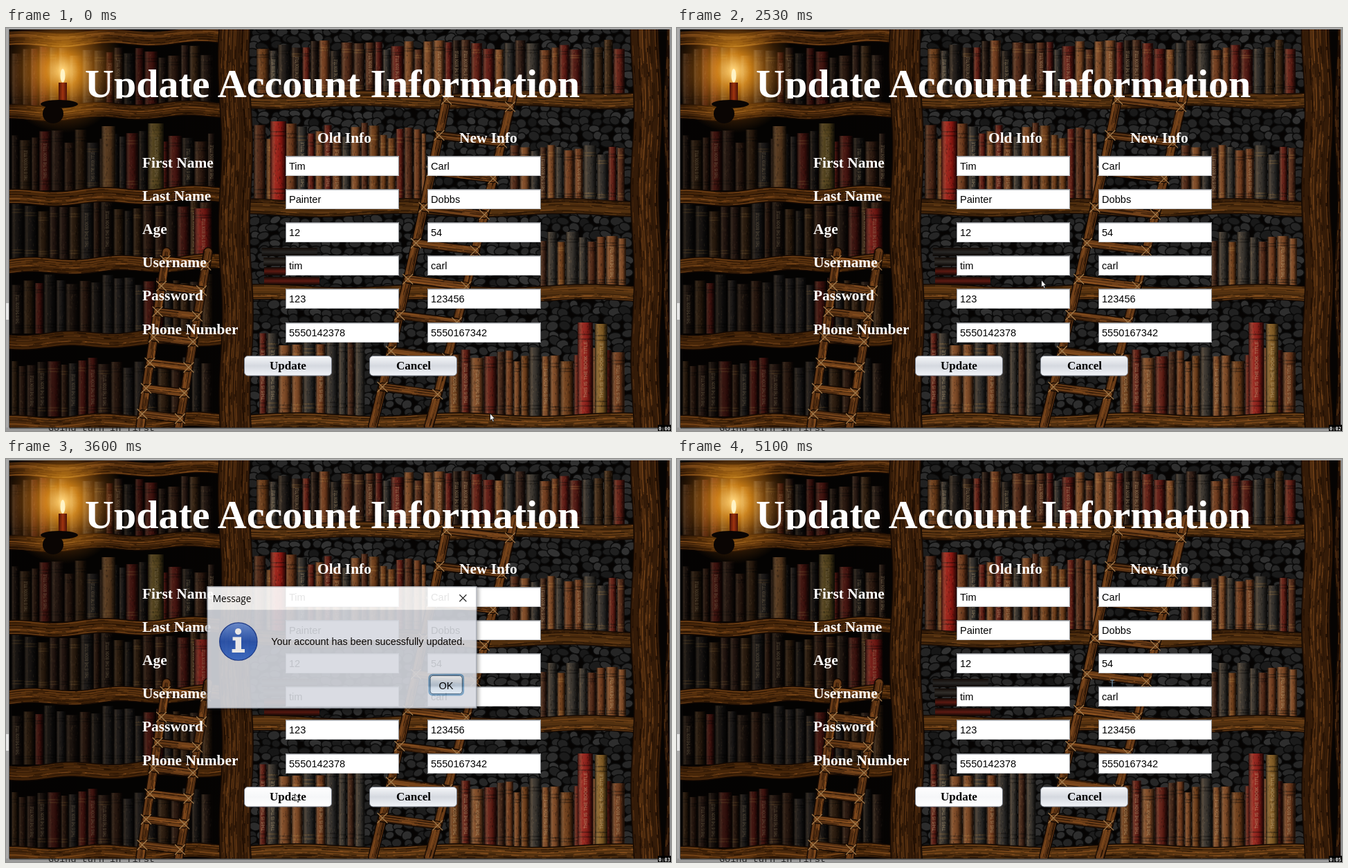
These frames come from a looping animation (961 px wide and 583 px high, 5200 ms). An HTML page with a canvas:

```html
<!DOCTYPE html>
<html lang="en">
<head>
<meta charset="utf-8">
<title>Update Account Information</title>
<style>
html, body { margin: 0; width: 100%; height: 100%; overflow: hidden; background: #000; }
canvas, #ui { position: absolute; left: 0; top: 0; width: 961px; height: 583px; }
.serif { font: bold 21.4px "Liberation Serif", "Times New Roman", serif; fill: #fff; }
.sans { font: 14.6px "Liberation Sans", Arial, sans-serif; fill: #000; }
</style>
</head>
<body>
<canvas id="room" width="961" height="583"></canvas>
<svg id="ui" viewBox="0 0 961 583">
  <defs>
    <linearGradient id="btn" x2="0" y2="1">
      <stop stop-color="#f7f8fa"/><stop offset=".5" stop-color="#d5d9e0"/><stop offset="1" stop-color="#f2f4f8"/>
    </linearGradient>
    <linearGradient id="hot" x2="0" y2="1">
      <stop stop-color="#fff"/><stop offset=".5" stop-color="#f6f7f9"/><stop offset="1" stop-color="#fff"/>
    </linearGradient>
    <linearGradient id="ok" x2="0" y2="1">
      <stop stop-color="#f2f6fa"/><stop offset=".5" stop-color="#c3d0de"/><stop offset="1" stop-color="#dfe9f3"/>
    </linearGradient>
    <linearGradient id="okHot" x2="0" y2="1">
      <stop stop-color="#fff"/><stop offset=".5" stop-color="#d6e0ea"/><stop offset="1" stop-color="#f0f6fc"/>
    </linearGradient>
    <linearGradient id="blue" x2="0" y2="1">
      <stop stop-color="#6f95dd"/><stop offset=".5" stop-color="#2a57b5"/><stop offset="1" stop-color="#3f72d2"/>
    </linearGradient>
    <filter id="soft" x="-10%" y="-10%" width="120%" height="120%"><feGaussianBlur stdDeviation="3"/></filter>
  </defs>
  <svg width="961" height="102"><text class="serif" x="114" y="100" style="font-size:58px">Update Account Information</text></svg>
  <g id="form"></g>
  <g id="dialog">
    <rect x="288" y="184" width="395" height="180" opacity=".45" filter="url(#soft)"/>
    <rect x="290" y="184" width="391" height="177" fill="#d6d9e0"/>
    <rect x="290" y="184" width="391" height="34" fill="#fff"/>
    <rect x="290.5" y="184.5" width="390" height="176" fill="none" stroke="#6d7480" stroke-opacity=".7"/>
    <text x="298" y="207" style="font:13.7px 'Open Sans','Noto Sans',sans-serif">Message</text>
    <path d="M656 196l10 10m0-10l-10 10" stroke="#111" stroke-width="1.2"/>
    <circle cx="335.3" cy="264" r="27.3" fill="url(#blue)" stroke="#1d3f94" stroke-width="1.2"/>
    <circle cx="335" cy="249.5" r="4.6" fill="#fff"/>
    <path d="M327 257.5h12.5v17.5h5v5h-18.5v-5h5v-12.500h-4z" fill="#fff"/>
    <text class="sans" x="383" y="269" style="font-size:14.4px">Your account has been sucessfully updated.</text>
    <rect x="612" y="312" width="49.5" height="29.5" rx="5" fill="none" stroke="#6e9bc0" stroke-width="2.4"/>
    <rect id="okBtn" x="613.5" y="313.5" width="46.5" height="26.5" rx="4" stroke="#35536e"/>
    <text class="sans" x="626" y="333">OK</text>
  </g>
  <path d="M0 0H961V2H5V583H0Z" fill="#a9a9a9"/>
  <path d="M4.5 2V579" stroke="#555"/>
  <path d="M959 2h2v577h-2z" fill="#8c8c8c"/>
  <rect y="398" width="4" height="24" fill="#e4e4e4"/>
  <svg y="578" width="961" height="5">
    <rect width="961" height="5" fill="#9b9b9b"/>
    <rect x="5" width="938" height="1.5" fill="#444"/>
    <text x="61" y="5" style="font:13.5px 'Liberation Mono',monospace" fill="#222">Going turn in first</text>
  </svg>
  <rect x="942" y="574" width="19" height="9"/>
  <text id="clock" x="943" y="581.5" fill="#fff" style="font:bold 7px 'DejaVu Sans Mono',monospace"></text>
  <path id="arrow" d="M.5 .5V11L2.8 8.8 4.5 12.5 6.2 11.8 4.6 8.2H7.5Z" fill="#fff" stroke="#111" stroke-width=".9"/>
  <path id="caret" d="M626 320h6M629 320v10" fill="none" stroke="#7fa6c4"/>
</svg>
<script>
const $ = id => document.getElementById(id);
const g = $('room').getContext('2d');
let seed = 41;
const rnd = (a = 0, b = 1) => {
  seed = (seed * 1664525 + 1013904223) % 4294967296;
  return a + (b - a) * seed / 4294967296;
};
const pick = list => list[Math.floor(rnd(0, list.length))];

// ---- library background ----
const dark = ['#1c110d', '#2b1812', '#171413', '#30190f', '#4a120e', '#232020', '#35200f', '#5c1611'];
const warm = ['#4c2414', '#6c371a', '#5e1a12', '#33302c', '#7a4522', '#3c2014', '#6b3a17', '#292827'];

function fade(x0, y0, x1, y1, ...colors) {
  const f = g.createLinearGradient(x0, y0, x1, y1);
  colors.forEach((c, i) => f.addColorStop(i / (colors.length - 1), c));
  return f;
}

function book(x, w, top, base, color) {
  const h = base - top;
  g.fillStyle = color;
  g.fillRect(x, top, w, h);
  g.fillStyle = rnd() < .3 ? 'rgba(190,140,70,.25)' : 'rgba(0,0,0,.35)';
  for (const k of [.12, .17, .83, .88]) g.fillRect(x, top + h * k, w, 2);
  for (let i = 0; i < h * w / 22; i++) {
    g.fillStyle = rnd() < .6 ? 'rgba(0,0,0,.3)' : 'rgba(255,200,140,.12)';
    g.fillRect(x + rnd(0, w - 1), top + rnd(0, h - 2), 1, rnd(1, 4));
  }
  if (rnd() < .25) {
    g.save();
    g.translate(x + w / 2 + 3, base - h * .2);
    g.rotate(-Math.PI / 2);
    g.font = 'bold 7px "Liberation Sans", sans-serif';
    g.fillStyle = 'rgba(215,190,145,.45)';
    g.fillText('THIS IS THE BOOK TITLE', 0, 0, h * .6);
    g.restore();
  }
  g.fillStyle = fade(x, 0, x + w, 0, 'rgba(0,0,0,.7)', 'rgba(255,210,160,.08)', 'rgba(0,0,0,.15)', 'rgba(0,0,0,.85)');
  g.fillRect(x, top, w, h);
}
function row(x0, x1, floor, height, colors) {
  for (let x = x0, w; x < x1 - 6; x += w) {
    w = Math.min(rnd(10, 20), x1 - x);
    book(x, w - 1, floor - height * rnd(.78, 1), floor, pick(colors));
  }
}

// Strokes a path of points as grained wood.
function beam(pts, w, color) {
  const [x, y] = pts[0], [u, v] = pts[pts.length - 1], len = Math.hypot(u - x, v - y);
  const line = (off, lw, c) => {
    g.lineWidth = lw;
    g.strokeStyle = c;
    g.beginPath();
    for (const p of pts) g.lineTo(p[0] + off * (y - v) / len, p[1] + off * (u - x) / len);
    g.stroke();
  };
  g.lineJoin = 'round';
  line(0, w, '#140903');
  line(0, w - 3, color);
  for (let i = 0; i < w * .8; i++) {
    g.setLineDash([rnd(10, 60), rnd(3, 30)]);
    line(rnd(-.42, .42) * w, rnd(.6, 1.6), rnd() < .6 ? 'rgba(20,8,0,.5)' : 'rgba(175,105,42,.35)');
  }
  g.setLineDash([]);
}
function wavy(x, y, u, v, w, color) {
  const pts = [], phase = rnd(0, 6), across = u - x > v - y;
  for (let k = 0; k <= 1; k += 1 / 32) {
    const s = 2.5 * Math.sin(k * 15 + phase);
    pts.push([x + (u - x) * k + (across ? 0 : s), y + (v - y) * k + (across ? s : 0)]);
  }
  beam(pts, w, color);
}

function ladder(x, top, gap, lean, bend, step) {
  const rail = (side, y) => {
    const d = y - top;
    return [x - lean * d - bend * d * d + side * gap * (1 - d * .0003), y];
  };
  const ys = Array.from({ length: 12 }, (_, i) => top + (576 - top) * i / 11);
  g.lineCap = 'round';
  for (const side of [0, 1]) beam(ys.map(y => rail(side, y)), 14, '#673a17');
  for (let y = top + step / 3; y < 570; y += step) {
    const ends = [rail(0, y), rail(1, y + gap / 9)];
    beam(ends, 13, '#704019');
    g.strokeStyle = '#a07a4c';
    g.lineWidth = 1.3;
    for (const [a, b] of ends) for (const k of [-1, 1]) {
      g.beginPath();
      g.moveTo(a - 7, b - 7 * k);
      g.lineTo(a + 7, b + 7 * k);
      g.stroke();
    }
  }
  g.lineCap = 'butt';
}

function paintRoom() {
  g.fillStyle = '#060403';
  g.fillRect(0, 0, 961, 583);
  g.strokeStyle = '#0b0b0b';
  g.lineWidth = 1.5;
  for (let y = 4; y < 575; y += 11) for (let x = 358; x < 905; x += 15) {
    g.fillStyle = `hsl(0 0% ${rnd(9, 20)}%)`;
    g.beginPath();
    g.ellipse(x + rnd(-4, 4), y + rnd(-3, 3), rnd(6, 10), rnd(5, 7), rnd(-.5, .5), 0, 7);
    g.fill();
    g.stroke();
  }

  const left = [14, 120, 243, 342, 450, 570], right = [104, 260, 384, 570];
  for (const y of left.slice(1)) row(8, 303, y - 8, 88, dark);
  row(362, 900, 95, 78, dark.concat(warm));
  row(358, 608, 252, 115, warm);
  row(728, 895, 252, 85, warm);
  row(772, 897, 376, 85, warm);
  row(366, 525, 562, 130, warm);
  row(640, 898, 562, 100, warm);
  // a few large spines
  book(138, 20, 142, 235, '#80522a');
  book(205, 23, 138, 235, '#6f5a24');
  book(272, 25, 261, 334, '#8e1915');
  book(382, 23, 135, 252, '#981812');
  book(826, 22, 426, 562, '#921d18');
  book(851, 18, 428, 562, '#805a22');
  for (let y = 318; y < 372; y += 14) {
    g.fillStyle = fade(0, y, 0, y + 12, '#120a06', pick(warm), '#0a0604');
    g.fillRect(368 + rnd(0, 8), y, 80, 12);
  }
  g.fillStyle = fade(5, 0, 400, 0, 'rgba(0,0,0,.4)', 'rgba(0,0,0,.35)', 'rgba(0,0,0,0)');
  g.fillRect(5, 0, 395, 583);

  for (const y of left) wavy(4, y + 3, 312, y - 3, 22, '#472609');
  for (const y of right) wavy(350, y, 910, y, 23, '#52300f');
  wavy(331, 0, 333, 580, 46, '#341b08');
  wavy(925, 0, 926, 580, 42, '#341b08');
  wavy(956, 0, 956, 580, 8, '#221207');
  ladder(640, 86, 95, .2, .00005, 52);
  ladder(232, 324, 60, .15, 0, 37);

  // candle
  g.globalCompositeOperation = 'screen';
  const glow = g.createRadialGradient(82, 62, 2, 82, 62, 90);
  ['#ffd070', '#c47a14', '#70400a', '#2c1703', '#000'].forEach((c, i) => glow.addColorStop(i / 4, c));
  g.fillStyle = glow;
  g.fillRect(5, 2, 170, 155);
  g.globalCompositeOperation = 'source-over';
  g.fillStyle = fade(75, 0, 89, 0, '#3c0c05', '#a0340f', '#3c0c05');
  g.fillRect(76, 79, 12, 26);
  g.fillStyle = '#0a0503';
  g.beginPath();
  g.ellipse(77, 110, 27, 6, 0, 0, 7);
  g.ellipse(68, 124, 15, 14, 0, 0, 7);
  g.fill();
  g.fillStyle = '#fff3c4';
  g.beginPath();
  g.ellipse(82, 69, 3.5, 10, 0, 0, 7);
  g.fill();
}

// ---- form ----
const rows = [
  ['First Name', 'Tim', 'Carl'], ['Last Name', 'Painter', 'Dobbs'], ['Age', '12', '54'],
  ['Username', 'tim', 'carl'], ['Password', '123', '123456'], ['Phone Number', '5550142378', '5550167342']
];
const label = (x, y, s) => `<text class="serif" x="${x}" y="${y}">${s}</text>`;
const field = (x, y, s) => `<rect x="${x}" y="${y}" width="164" height="29" fill="#fff"/>
  <path d="M${x + .5} ${y + 29}v-28.5h163v28.5" fill="none" stroke="#8d8f93"/>
  <path d="M${x + 1} ${y + 1.5}h162M${x} ${y + 28.5}h164" stroke="#c9cbce"/>
  <text class="sans" x="${x + 5}" y="${y + 20}">${s}</text>`;
const button = (id, x, tx, s) => `<rect id="${id}" x="${x + .5}" y="474.5" width="126" height="28.5" rx="5" stroke="#777d88"/>
  <text class="serif" x="${tx}" y="494" style="font-size:17px;fill:#000">${s}</text>`;
$('form').innerHTML = label(450, 166, 'Old Info') + label(655, 166, 'New Info') +
  rows.map(([name, was, now], i) => {
    const y = Math.round(185 + i * 48.1);
    return label(197, y + 17, name) + field(404, y, was) + field(609, y, now);
  }).join('') + button('update', 344, 381, 'Update') + button('cancel', 525, 564, 'Cancel');

// ---- motion ----
// Pointer stops: arrival time, x, y.
const stops = [
  [0, 699, 557], [270, 756, 506], [690, 575, 515], [940, 432, 487], [1640, 536, 333], [2110, 647, 210],
  [2270, 534, 356], [2800, 417, 475], [3200, 417, 484], [3650, 417, 484], [3750, 523, 362],
  [4390, 620, 324], [4940, 628, 324]
];
const trip = 320; // longest move between stops, ms
function pointer(t) {
  const i = stops.findIndex(s => s[0] > t);
  if (i < 0) return stops[stops.length - 1].slice(1);
  const [t0, x, y] = stops[i - 1], [t1, u, v] = stops[i];
  const k = Math.max(0, 1 - (t1 - t) / Math.min(trip, t1 - t0)), e = k * k * (3 - 2 * k);
  return [x + (u - x) * e, y + (v - y) * e];
}
const fill = (id, name) => $(id).setAttribute('fill', `url(#${name})`);

function draw() {
  const t = performance.now() % 5200, done = t >= 5100;
  const alpha = done || t < 3480 ? 0 : t < 3600 ? .38 : t < 3750 ? .9 : 1;
  $('arrow').setAttribute('transform', `translate(${pointer(t)})`);
  $('arrow').style.display = done ? 'none' : '';
  $('caret').style.display = done ? '' : 'none';
  $('dialog').setAttribute('opacity', alpha);
  $('dialog').setAttribute('transform', `translate(485.5 272.5) scale(${.964 + .036 * alpha}) translate(-485.5 -272.5)`);
  fill('update', t >= 940 && t < 1520 || t >= 2800 ? 'hot' : 'btn');
  fill('cancel', t >= 690 && t < 840 ? 'hot' : 'btn');
  fill('okBtn', t >= 4390 ? 'okHot' : 'ok');
  $('clock').textContent = '0:0' + Math.floor((t + 100) / 1040);
  requestAnimationFrame(draw);
}
paintRoom();
draw();
</script>
</body>
</html>
```
